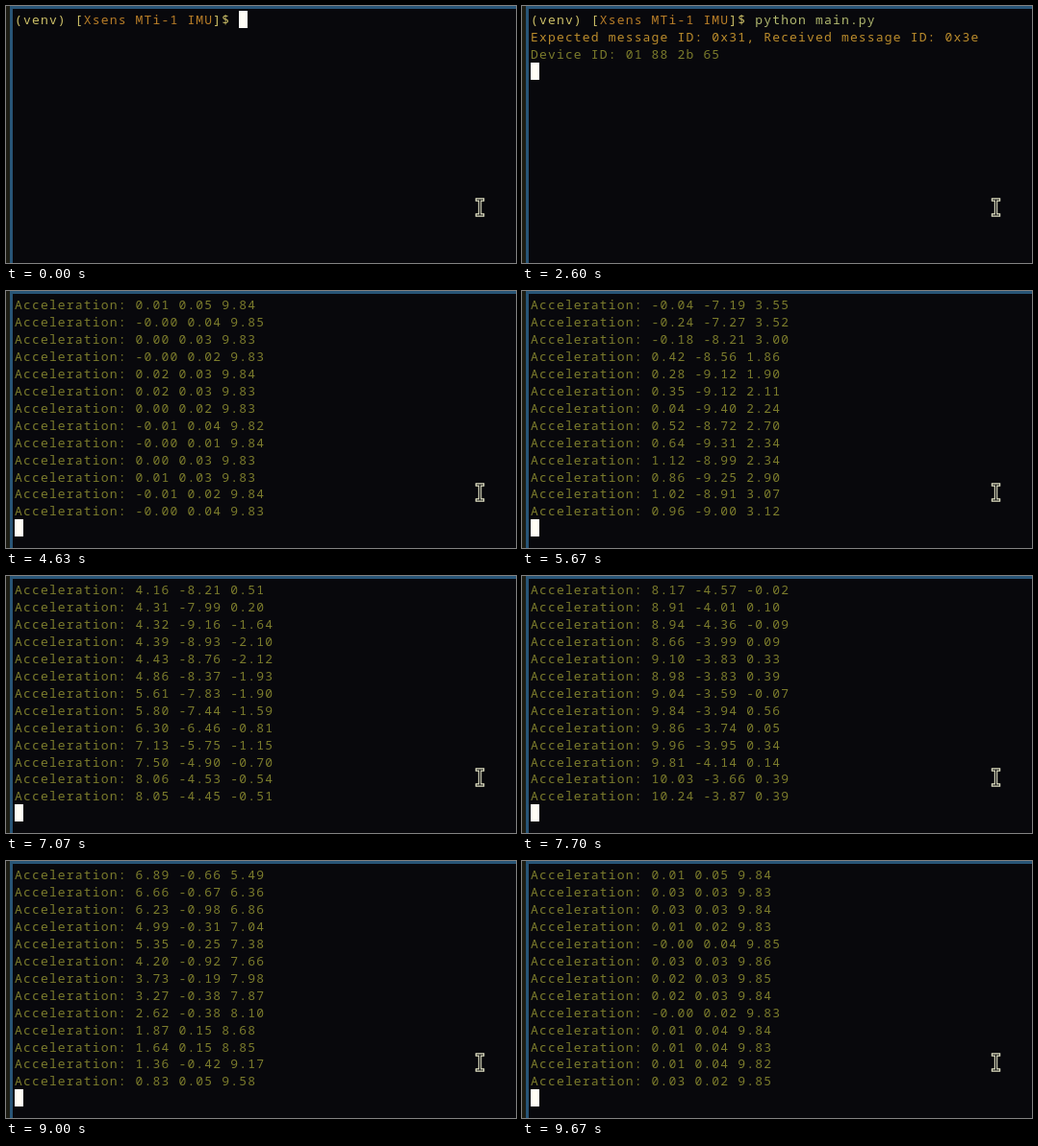
An HTML page with a canvas that plays this animation: 530 by 268 pixels, repeating every 9710 ms.

```html
<!DOCTYPE html>
<html lang="en">
<head>
<meta charset="utf-8">
<title>Accelerometer log</title>
<style>
html, body { margin: 0; width: 100%; height: 100%; overflow: hidden; background: #08080c; }
canvas { display: block; }
</style>
</head>
<body>
<canvas id="stage" width="530" height="268"></canvas>
<script>
const ctx = document.getElementById('stage').getContext('2d');
const LOOP = 9710, CELL = 8.97, ROW = 17.95, LEFT = 9, TOP = 4.9, VISIBLE = 13, COUNT = 177;
const BACK = '#08080c', BORDER = '#285577';
const YELLOW = '#cdc068', ORANGE = '#b97e28', AMBER = '#bb8c2c', LIME = '#b2b970', OLIVE = '#7c7c2c';

// A line is a list of [text, colour] runs.
const prompt = [['(venv) [', YELLOW], ['Xsens MTi-1 IMU', ORANGE], [']$ ', YELLOW]];
const command = 'python main.py ';
// The last key completes the file name.
const keyTimes = [430, 530, 600, 700, 800, 1000, 1370, 1470, 1570, 1670];
const replies = [
  [2570, 'Expected message ID: 0x31, Received message ID: 0x3e', AMBER],
  [2600, 'Device ID: 01 88 2b 65', OLIVE],
  [3600, 'Current output configuration: 40 20 00 1e', OLIVE]
];

// Key poses of the sensor: sample number, then x, y, z.
const rest = [0.01, 0.03, 9.84];
const poses = [
  [31, ...rest],
  [44, -0.04, -7.19, 3.55],
  [48, 0.28, -9.12, 1.9],
  [56, 0.96, -9, 3.12],
  [86, 4.16, -8.21, 0.51],
  [89, 4.39, -8.93, -2.1],
  [98, 8.05, -4.45, -0.51],
  [125, 10.54, -3.59, 0.78],
  [128, 9.75, -0.45, 1.66],
  [137, 9.12, -1.11, 4.74],
  [160, ...rest]
];

const noise = n => {
  const s = Math.sin(n * 12.9898) * 43758.5453;
  return (s - Math.floor(s)) * 2 - 1;
};

// Eases between poses with some hand shake; at rest only sensor noise is left.
function sample(k) {
  const next = poses.findIndex(p => p[0] > k);
  if (next < 1) return rest.map((v, i) => v + 0.018 * noise(k * 3 + i + 1));
  const [start, ...a] = poses[next - 1], [end, ...b] = poses[next];
  const u = (k - start) / (end - start), ease = u * u * (3 - 2 * u);
  const shake = 0.5 * Math.sin(Math.PI * u);
  return a.map((v, i) => v + (b[i] - v) * ease + shake * noise(k * 3 + i + 1));
}

const log = Array.from({ length: COUNT }, (_, k) =>
  [['Acceleration: ' + sample(k).map(v => v.toFixed(2)).join(' '), OLIVE]]);

function drawLine(runs, row) {
  let col = 0;
  for (const [text, colour] of runs) {
    ctx.fillStyle = colour;
    for (const ch of text) ctx.fillText(ch, LEFT + CELL * col++, 19 + ROW * row);
  }
}

function rect(colour, x, y, w, h) {
  ctx.fillStyle = colour;
  ctx.fillRect(x, y, w, h);
}

function drawPointer() {
  const beam = new Path2D('M489.5 202H492L492.5 202.5L493 202H495.5M492.5 202V218M489.5 218H492L492.5 217.5L493 218H495.5');
  ctx.lineCap = 'square';
  for (const [colour, width] of [['#e6e6c8', 3.4], [BACK, 1.2]]) {
    ctx.strokeStyle = colour;
    ctx.lineWidth = width;
    ctx.stroke(beam);
  }
}

function draw(t) {
  rect(BACK, 0, 0, 530, 268);
  rect('#1d1d14', 0, 0, 4, 268);
  rect(BORDER, 4, 0, 3, 268);
  rect(BORDER, 4, 0, 526, 3);

  const pressed = keyTimes.filter(at => t >= at).length;
  const typed = pressed < keyTimes.length ? command.slice(0, pressed) : command;
  const count = Math.min(COUNT, Math.max(0, Math.floor((t - 3800 + 3.4) * 0.03) + 1));
  const lines = [
    [...prompt, [typed, LIME]],
    ...replies.filter(r => t >= r[0]).map(r => [r.slice(1)]),
    ...log.slice(0, count)
  ].slice(-VISIBLE);

  ctx.font = '13px "Noto Sans Mono", "DejaVu Sans Mono", monospace';
  lines.forEach(drawLine);

  const entered = t >= 2000;
  if (!entered || t >= 2100) {
    const col = entered ? 0 : 26 + typed.length;
    const row = entered ? lines.length : 0;
    rect('#fffdf6', Math.round(LEFT + CELL * col), Math.round(TOP + ROW * row), 9, 18);
  }
  drawPointer();
}

const start = performance.now();
function tick() {
  draw((performance.now() - start) % LOOP);
  requestAnimationFrame(tick);
}
tick();
</script>
</body>
</html>
```
